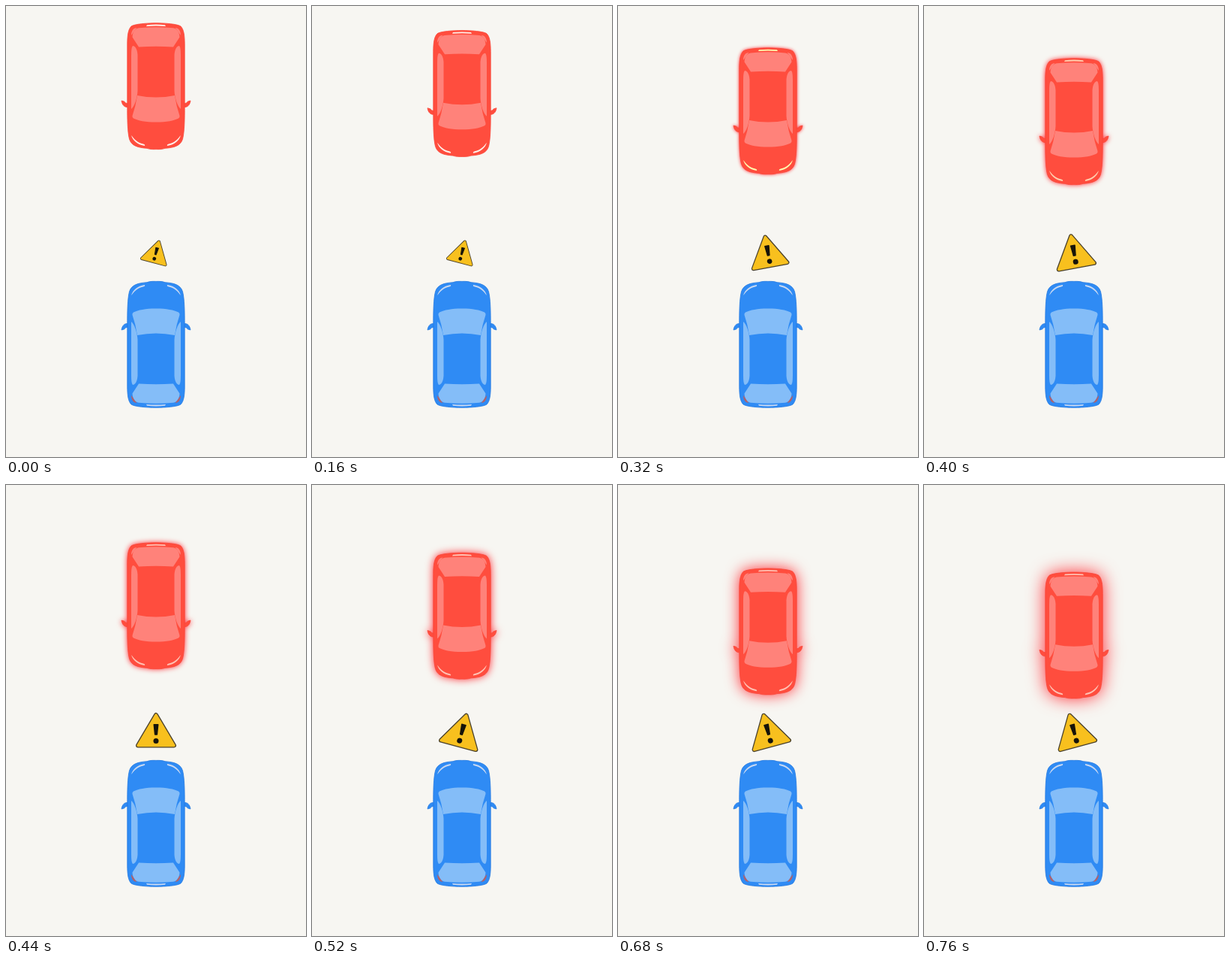
Write an HTML page that moves like this. It is 400x600 px and loops after 0.8 s.

```html
<!DOCTYPE html>
<html lang="en">
<head>
<meta charset="utf-8">
<title>Collision warning</title>
<style>
  html, body { margin: 0; height: 100%; overflow: hidden; background: #f7f6f2; }
  svg { display: block; width: 100%; height: 100%; }
  .blue { --body: #2f8bf4; --edge: #2579e0; --glass: #84bdf8; --light: #c9d9f2; --tail: #b0626c; }
  .red { --body: #ff4d3e; --edge: #f9473a; --glass: #ff827a; --tail: #ff827a; }
  .body { fill: var(--body); stroke: var(--edge); stroke-width: .8; }
  .glass { fill: var(--glass); }
  .light { fill: var(--light); }
  .tail { fill: var(--tail); }
</style>
</head>
<body>
<svg viewBox="0 0 400 600">
  <defs>
    <g id="side">
      <path class="body" d="M37 56.5C42 56 45 59 46 65L42.500 64Q41 61.500 37 61Z"/>
    </g>
    <g id="trim">
      <path class="glass" d="M33 54C29 57 25 68 24.500 78V126C25 134 28 138 31 138C33 136 33 130 33 120Z"/>
      <path class="light" d="M33 19C31 12 25 6.500 15 5C14.500 6.500 15 7 17 7.500C25 9 29 14 33 19Z"/>
      <path class="tail" d="M33 152C33 158 30 162 25.500 162C29 159 30 155 33 152Z"/>
    </g>
    <g id="car">
      <use href="#side"/>
      <use href="#side" transform="scale(-1 1)"/>
      <path class="body" d="M0 .4C6 .2 9 .6 12 1.700C24 2.500 33 5 35.500 14
        C38 24 38.200 40 38.200 60V140C38.200 152 37 160 33 164C29 167 12 168.300 0 168.300
        C-12 168.300 -29 167 -33 164C-37 160 -38.200 152 -38.200 140V60
        C-38.200 40 -38 24 -35.500 14C-33 5 -24 2.500 -12 1.700C-9 .6 -6 .2 0 .4Z"/>
      <path class="glass" d="M0 36.500C14 36.500 24 38.500 30 41.500Q32 42.500 31.500 45
        Q27 58 25 72Q0 67 -25 72Q-27 58 -31.500 45Q-32 42.500 -30 41.500C-24 38.500 -14 36.500 0 36.500Z"/>
      <path class="glass" d="M-23 136.500Q0 138 23 136.500L31.500 149.500C31 157 28 161 23 161.700
        Q0 164 -23 161.700C-28 161 -31 157 -31.500 149.500Z"/>
      <use href="#trim"/>
      <use href="#trim" transform="scale(-1 1)"/>
      <path class="light" d="M-13 164Q0 165 13 164L12 165.800Q0 167 -12 165.800Z"/>
    </g>
  </defs>
  <g id="red" class="red"><use href="#car"/></g>
  <use href="#car" class="blue" transform="translate(200 366)"/>
  <g id="sign" stroke-linejoin="round">
    <path d="M0 -22L24 18.500H-24Z" fill="#4a412c" stroke="#4a412c" stroke-width="6"/>
    <path d="M0 -22L24 18.500H-24Z" fill="#f8c01e" stroke="#f8c01e" stroke-width="3.400"/>
    <path d="M-2.700 -9.300H2.700L1.300 4H-1.300Z" fill="#17140a" stroke="#17140a" stroke-width="1.600"/>
    <circle cy="12.500" r="3.500" fill="#17140a"/>
  </g>
</svg>
<script>
  const red = document.getElementById('red');
  const sign = document.getElementById('sign');
  const LOOP = 800, STEP = 40;

  // Eased progress between two times, clamped to 0..1
  const ease = (t, from, to) => {
    const p = Math.min(1, Math.max(0, (t - from) / (to - from)));
    return p * p * (3 - 2 * p);
  };

  function draw(t) {
    const y = 191 + 94 * ease(t, 0, LOOP);
    red.setAttribute('transform', `translate(200 ${y}) scale(1 -1)`);

    const blur = 13 * (t / LOOP) ** 2;
    red.style.filter = t < 200 ? 'none' : `drop-shadow(0 0 ${blur}px #ff3038)`;

    const flash = Math.max(0, 1 - Math.abs(t - 320) / 110);
    const dim = ease(t, 280, 440);
    red.style.setProperty('--light',
      `rgb(255 ${240 - 46 * dim + 20 * flash} ${234 - 54 * dim - 50 * flash})`);

    const turn = 15 - 30 * (ease(t, 200, 360) - ease(t, 360, 520) + ease(t, 520, 680));
    const size = 0.68 + 0.32 * ease(t, 200, 360);
    sign.setAttribute('transform', `translate(200 328) rotate(${turn}) scale(${size})`);
  }

  function tick(now) {
    draw(Math.floor((now % LOOP) / STEP) * STEP);
    requestAnimationFrame(tick);
  }
  draw(0);
  requestAnimationFrame(tick);
</script>
</body>
</html>
```
